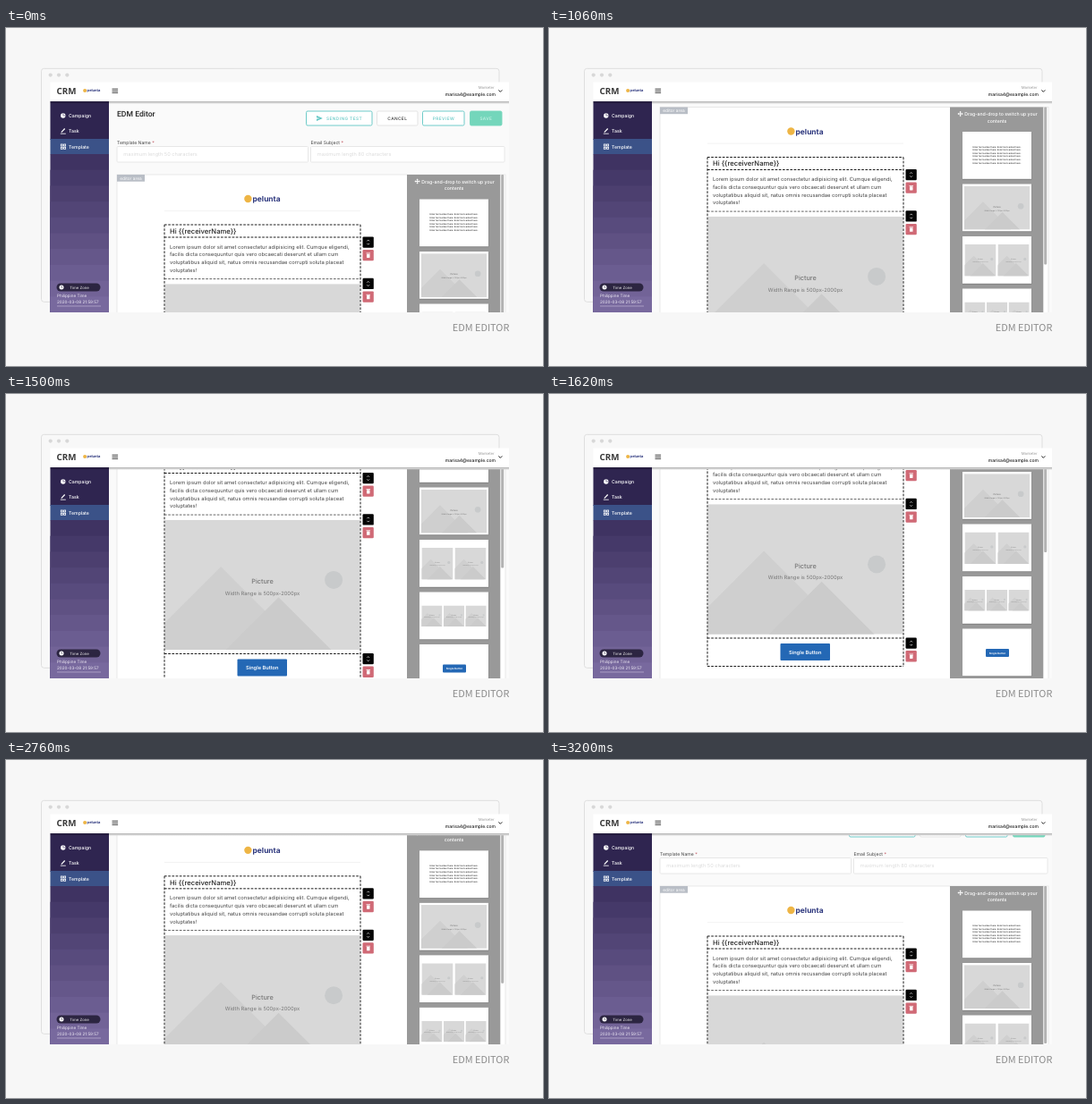
An HTML page for the animation above (3.32 s loop, 600x378 px).

```html
<!DOCTYPE html>
<html lang="en">
<head>
<meta charset="utf-8">
<title>EDM Editor</title>
<style>
html, body { margin: 0; width: 100%; height: 100%; overflow: hidden; background: #f7f7f7; }
svg { display: block; }
text { font-family: Inter, "Noto Sans", sans-serif; text-rendering: geometricPrecision; }
</style>
</head>
<body>
<svg id="stage" width="600" height="378" viewBox="0 0 600 378" xmlns="http://www.w3.org/2000/svg"></svg>
<script>
const LOOP = 3320, FULL = 163, FIRST = 23, BACK = 140.5;
const DOWN = [720, 840, 940, 1060, 1160, 1280, 1400, 1500, 1620];
const UP = [2420, 2540, 2640, 2760, 2880, 2980, 3100, 3200];
const TEAL = '#5fc6c3', NAVY = '#2b357c', GOLD = '#eeb545';

const rect = (x, y, w, h, fill, more = '') =>
  `<rect x="${x}" y="${y}" width="${w}" height="${h}" fill="${fill}" ${more}/>`;
const circle = (x, y, r, fill, more = '') =>
  `<circle cx="${x}" cy="${y}" r="${r}" fill="${fill}" ${more}/>`;
const line = (d, stroke, width, more = '') =>
  `<path d="${d}" fill="none" stroke="${stroke}" stroke-width="${width}" ${more}/>`;
const text = (x, y, size, fill, str, more = '') =>
  `<text x="${x}" y="${y}" font-size="${size}" fill="${fill}" ${more}>${str}</text>`;
const MID = 'text-anchor="middle" ', END = 'text-anchor="end" ';
const weight = w => `font-weight="${w}"`;

function brand(x, y, k) {
  return circle(x + 4.4 * k, y, 4.2 * k, GOLD) +
    text(x + 9.6 * k, y + 3 * k, 8.4 * k, NAVY, 'pelunta', weight(700));
}

function picture(x, y, w, h) {
  const k = w / 218;
  const peak = (px, py, fill) => {
    const d = h - py;
    return `<path d="M${px} ${py}L${px + d} ${h}H${px - d}Z" fill="${fill}"/>`;
  };
  return `<svg x="${x}" y="${y}" width="${w}" height="${h}">` +
    rect(0, 0, w, h, '#d8d8d8') +
    peak(w * .287, h * .36, '#cfcfcf') + peak(w * .583, h * .595, '#cbcbcb') +
    circle(w * .865, h * .462, w * .046, '#c8cacb') +
    text(w / 2, h * .492, Math.max(1.6, 7.3 * k), '#777', 'Picture', MID + weight(500)) +
    text(w / 2, h * .577, Math.max(1.2, 5.8 * k), '#777', 'Width Range is 500px-2000px', MID) +
    '</svg>';
}

function blueButton(x, y, w, h, size) {
  return rect(x, y, w, h, '#2468b5', 'rx="1"') +
    text(x + w / 2, y + h / 2 + size * .36, size, '#fff', 'Single Button', MID + weight(600));
}

// move handle and delete button beside a block
function tools(y) {
  const x = 398.5, r = y + 14.6;
  return rect(x, y, 12.3, 12.3, '#050505', 'rx="1.2"') +
    line(`M${x + 4.9} ${y + 4.9}l1.3 -1.3l1.3 1.3M${x + 4.9} ${y + 7.5}l1.3 1.3l1.3 -1.3`, '#fff', .7) +
    rect(x, r, 12.3, 12.3, '#d06a76', 'rx="1.2"') +
    rect(x + 4.5, r + 4.7, 3.5, 4.2, '#fff', 'rx=".4"') +
    rect(x + 4, r + 3.5, 4.5, .8, '#fff');
}

function card(y, inner) {
  return rect(462, y + .7, 77.3, 53, '#000', 'opacity=".18"') + rect(462, y, 77, 52.8, '#fff') + inner;
}

function form() {
  const button = (x, w, label, tx, color, edge, fill) =>
    rect(x, 93, w, 16, fill, `rx="1.5" stroke="${edge}" stroke-width=".9"`) +
    text(tx, 102.8, 4.8, color, label, MID + weight(500) + ' letter-spacing=".4"');
  const field = (x, w, label, max) =>
    text(x, 130, 5.1, '#444', `${label} <tspan fill="#c0525c">*</tspan>`) +
    rect(x, 132.5, w, 17.5, '#fff', 'rx="1" stroke="#e2e2e2" stroke-width=".8"') +
    text(x + 7.3, 143.2, 5.65, '#dcdcdc', `maximum length ${max} characters`);
  return text(124, 99.4, 8.6, '#222', 'EDM Editor', 'style="font-family:Roboto,sans-serif" ' + weight(500)) +
    button(335.5, 73.5, 'SENDING TEST', 378, TEAL, TEAL, '#fff') +
    `<path d="M347 98l6.8 3l-6.8 3v-2.3l4 -.7l-4 -.7z" fill="${TEAL}"/>` +
    button(414.5, 45.5, 'CANCEL', 437.3, '#333', '#e0e0e0', '#fff') +
    button(465.5, 46.5, 'PREVIEW', 489, TEAL, TEAL, '#fff') +
    button(518.5, 35.5, 'SAVE', 536.4, '#c9f2e6', '#74d6bb', '#74d6bb') +
    field(124, 213.5, 'Template Name', 50) + field(340.5, 216.5, 'Email Subject', 80);
}

function editor() {
  const copy = [
    'Lorem ipsum dolor sit amet consectetur adipisicing elit. Cumque eligendi,',
    'facilis dicta consequuntur quis vero obcaecati deserunt et ullam cum',
    'voluptatibus aliquid sit, natus omnis recusandae corrupti soluta placeat',
    'voluptates!'
  ];
  const dash = 'stroke-dasharray="2.7 1.5"';
  return rect(124, 164, 434, 340, '#fff', 'stroke="#e3e3e3" stroke-width=".8"') +
    rect(124, 164, 31, 7.7, '#b9bec6') +
    text(139.5, 169.6, 4.8, '#fff', 'editor area', MID) +
    brand(266, 191, 1) +
    line('M177 204.6H396', '#efefef', .8) +
    text(183, 229.8, 7.65, '#222', 'Hi {{receiverName}}', weight(500)) +
    copy.map((s, i) => text(183, 246.5 + i * 8.8, 5.8, '#444', s)).join('') +
    picture(177.5, 286.2, 218, 145.5) +
    blueButton(258.5, 442, 55.5, 19, 5.7) +
    line('M177 220V467.5M396 220V467.5M177 220H396M177 234H396M177 436H396M177 467.5H396', '#1c1c1c', 1, dash) +
    line('M177 280.6H396', '#555', .9, dash) +
    [233.4, 279.8, 435.5].map(tools).join('');
}

function panel() {
  const phrase = 'Enter text content here.';
  let words = '';
  for (let i = 0; i < 6; i++)
    words += text(500.5, 209 + i * 3.6, 2.38, '#222', phrase + ' ' + phrase, MID + weight(500));
  return rect(448, 164, 104.3, 340, '#999') +
    rect(553.2, 164, 3, 176, '#b2b2b2', 'rx="1"') +
    line('M457.2 171.5h4.8M459.6 169.1v4.8', '#fff', .9) +
    '<path d="M459.6 168.4l1.2 1.4h-2.4zM459.6 174.6l1.2 -1.4h-2.4zM456.5 171.5l1.4 -1.2v2.4zM462.7 171.5l-1.4 -1.2v2.4z" fill="#fff"/>' +
    text(505, 173.5, 5.2, '#fff', 'Drag-and-drop to switch up your', MID + weight(500)) +
    text(500.5, 181.4, 5.2, '#fff', 'contents', MID + weight(500)) +
    card(191.5, words) +
    card(250, picture(464, 252.2, 73, 48.8)) +
    card(308.5, picture(464.5, 317.5, 35, 35.5) + picture(501.5, 317.5, 35, 35.5)) +
    card(367, [464.3, 488.9, 513.5].map(x => picture(x, 382, 23.2, 23.5)).join('')) +
    card(425.5, blueButton(488, 448, 26, 9, 2.9));
}

function sidebar() {
  const mix = (a, b, p) => Math.round(a + (b - a) * p);
  const n = 10, top = 141, step = 177 / n;
  let out = rect(49.5, 82, 65.5, 43, '#2f2550') + rect(49.5, 124, 65.5, 17.3, '#3b5288');
  for (let i = 0; i < n; i++) {
    const p = i / (n - 1);
    const fill = `rgb(${mix(63, 120, p)},${mix(51, 105, p)},${mix(98, 158, p)})`;
    out += rect(49.5, top + i * step, 65.5, 318 - top - i * step, fill);
  }
  ['Campaign', 'Task', 'Template'].forEach((s, i) =>
    out += text(70, 100 + i * 17.3, 5.2, '#fff', s, weight(500)));
  out += circle(63.8, 98, 2.7, '#fff') + line('M63.9 95.4v2.6h2.7', '#453866', .6) +
    line('M61.8 116.7l3.9 -4.2', '#fff', 1.2) + line('M60.8 118.2h6', '#fff', .8);
  for (const [x, y] of [[61.3, 130], [64.6, 130], [61.3, 133.3], [64.6, 133.3]])
    out += rect(x, y, 2, 2, 'none', 'stroke="#fff" stroke-width=".8"');
  return out +
    rect(56.5, 285.5, 49, 9, '#2c2541', 'rx="4.5"') +
    circle(62, 290, 2.5, '#fff') + line('M62 288.5v1.6h1.2', '#2c2541', .6) +
    text(82, 291.6, 4.3, '#eee', 'Time Zone', MID) +
    text(57, 300.7, 4.6, '#f0ecf6', 'Philippine Time') +
    text(57, 308.3, 4.6, '#f0ecf6', '2020-03-08 21:59:57') +
    line('M57 311H106', '#b5a9cc', .8);
}

function topbar() {
  return rect(49.5, 82, 512.5, 3.2, 'url(#shade)') + rect(49.5, 60.5, 512.5, 21.5, '#fff') +
    text(56.5, 73.8, 9.8, '#3a3a3a', 'CRM', 'style="font-family:Noto Sans,sans-serif" ' + weight(600)) +
    brand(86, 70, .48) +
    line('M118.5 68.2h6.6M118.5 70.3h6.6M118.5 72.4h6.6', '#444', 1) +
    text(545.5, 68, 4.2, '#999', 'Marketer', END) +
    text(547, 75.6, 5, '#222', 'marisa4@example.com', END + weight(500)) +
    line('M550.3 69.4l2 2l2 -2', '#222', 1);
}

document.getElementById('stage').innerHTML =
  '<defs><clipPath id="view"><rect x="115" y="84.2" width="447" height="233.8"/></clipPath>' +
  '<linearGradient id="shade" x2="0" y2="1"><stop stop-opacity=".3"/><stop offset="1" stop-opacity="0"/></linearGradient></defs>' +
  rect(0, 0, 600, 378, '#f7f7f7') +
  rect(39.5, 45.3, 511.5, 261, '#f8f8f8', 'rx="3" stroke="#dcdcdc" stroke-width=".9"') +
  [49.7, 59, 68.3].map(x => circle(x, 52.6, 2.1, '#d8d8d8')).join('') +
  rect(115, 82, 447, 236, '#fafafa') +
  `<g clip-path="url(#view)"><g id="page">${form()}${editor()}${panel()}</g></g>` +
  sidebar() + topbar() +
  text(562.3, 339.2, 10.9, '#8c8c8c', 'EDM EDITOR',
    END + weight(300) + ' style="font-family:Noto Sans CJK JP,Noto Sans CJK SC,Noto Sans CJK,Open Sans,sans-serif"');

const page = document.getElementById('page');

// the page jumps in equal notches, down to the end and back up
function scrollAt(t) {
  const passed = list => list.filter(s => t >= s).length;
  const up = passed(UP), down = passed(DOWN);
  if (up) return BACK - (up - 1) * (BACK - FIRST) / (UP.length - 1);
  return down ? FIRST + (down - 1) * (FULL - FIRST) / (DOWN.length - 1) : 0;
}

function draw() {
  page.setAttribute('transform', `translate(0 ${-scrollAt(performance.now() % LOOP)})`);
  requestAnimationFrame(draw);
}
draw();
</script>
</body>
</html>
```
